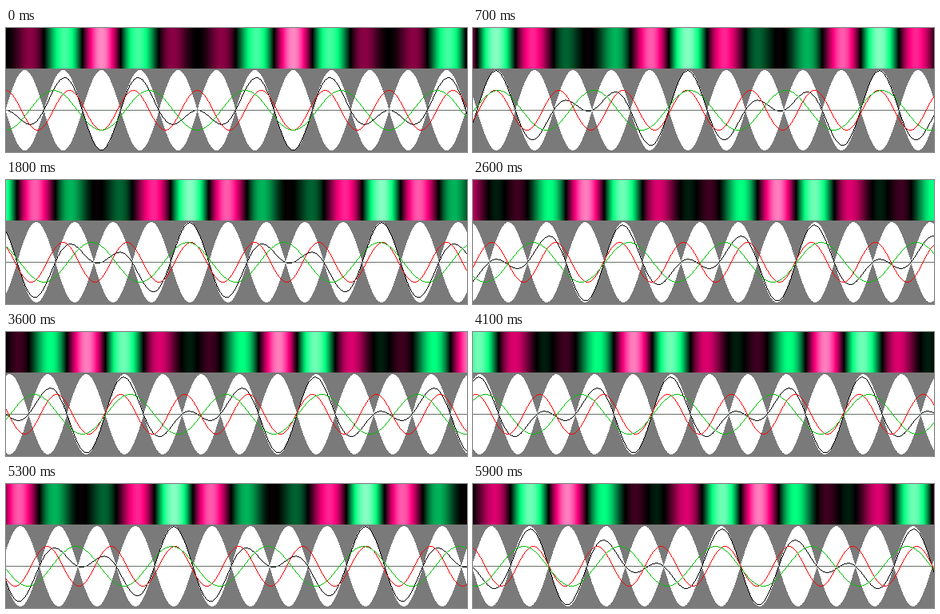
Animation, 577 px wide and 156 px high, one loop 6000 ms. Source, as a matplotlib script:

```python
import numpy as np
import matplotlib.pyplot as plt
from matplotlib.animation import FuncAnimation

W, H = 577, 156
FRAMES, INTERVAL = 60, 100
BAND_H = 51
MID, AMP = 103, 25
RED_LEN, GREEN_LEN = 80, 120
SPEED = 4            # pixels per frame, red to the right, green to the left
BRIGHTNESS = 0.77

GRAY = (0.482, 0.482, 0.482)
WHITE = (1, 1, 1)
BLACK = (0, 0, 0)
AXIS = (0.41, 0.44, 0.41)
RED = (1, 0, 0)
GREEN = (0, 0.75, 0)

x = np.arange(-1, W + 1)    # one extra column on each side for joining lines
rows = np.arange(H)[:, np.newaxis]


def phases(frame):
    """Angles of the two opposite travelling waves along the stage."""
    shift = SPEED * frame
    red = 2 * np.pi * (x + 1 - shift) / RED_LEN
    green = 2 * np.pi * (x + 1 + shift - GREEN_LEN / 2) / GREEN_LEN
    return red, green


def band_colors(level):
    """Spring green for positive levels, rose for negative ones, black at zero."""
    light = BRIGHTNESS * np.abs(level)
    chroma = 1 - np.abs(2 * light - 1)
    high, low = light + chroma / 2, light - chroma / 2
    up = level > 0
    rgb = [np.where(up, low, high), np.where(up, high, low), light]
    return np.stack(rgb, axis=-1)


def curve_mask(wave):
    """Crisp one-pixel curve: each column reaches halfway to its neighbours."""
    y = np.round(MID - AMP * wave)
    here = y[1:-1]
    before = here + 0.49 * (y[:-2] - here)
    after = here + 0.5 * (y[2:] - here)
    top = np.minimum(np.minimum(before, after), here)
    bottom = np.maximum(np.maximum(before, after), here)
    return (rows >= np.ceil(top)) & (rows <= np.floor(bottom))


def lobe_mask(height):
    return np.abs(rows - MID) <= np.round(height[1:-1])


def draw(frame):
    red, green = phases(frame)
    total = np.cos(red) + np.cos(green)
    envelope = 2 * AMP * np.abs(np.cos((red + green) / 2))

    stage = np.empty((H, W, 3))
    stage[:] = GRAY
    stage[lobe_mask(envelope)] = WHITE
    stage[curve_mask(total)] = BLACK
    stage[MID] = AXIS
    stage[curve_mask(np.cos(red))] = RED
    stage[curve_mask(np.cos(green))] = GREEN
    stage[:BAND_H] = band_colors(total[1:-1] / 2)
    return stage


fig = plt.figure(figsize=(W / 100, H / 100), dpi=100)
ax = fig.add_axes([0, 0, 1, 1])
ax.axis("off")
picture = ax.imshow(draw(0), aspect="auto", interpolation="nearest")


def update(frame):
    picture.set_data(draw(frame))
    return picture,


anim = FuncAnimation(fig, update, frames=FRAMES, interval=INTERVAL,
                     repeat=True, repeat_delay=0)
plt.show()
```
